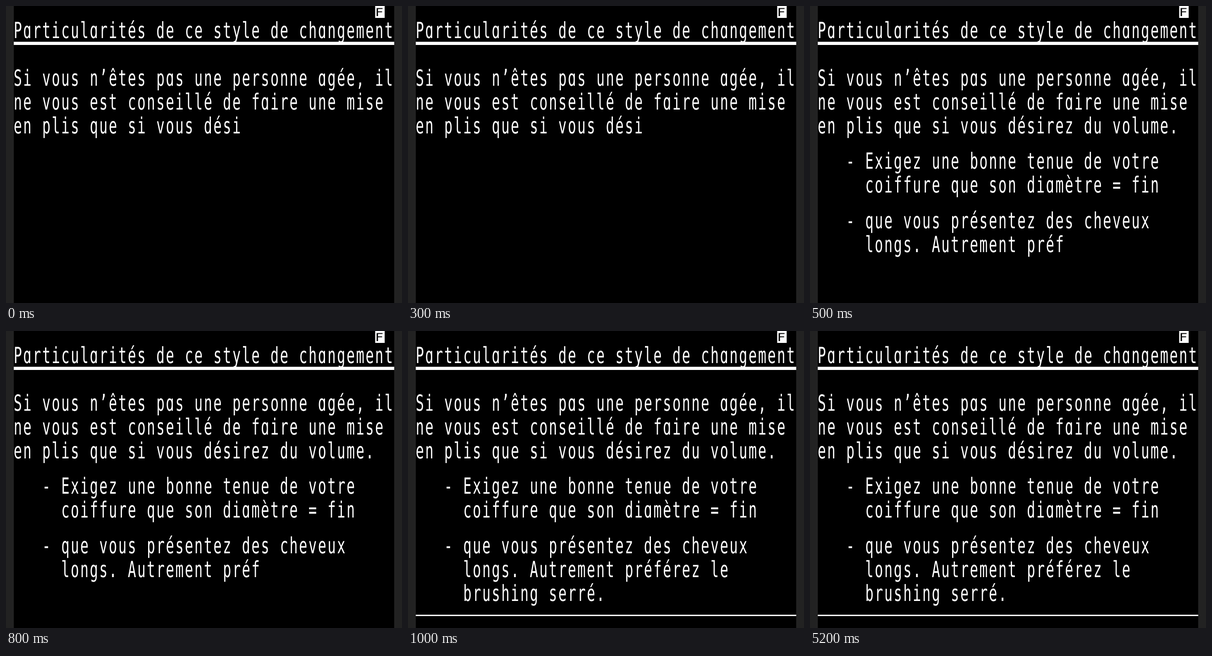
Recreate the animation shown at these times as an HTML page. Size 864 px wide and 648 px high, loop 8000 ms.

```html
<!DOCTYPE html>
<html lang="fr">
<head>
<meta charset="utf-8">
<title>Page télétexte</title>
<style>
  html, body { margin: 0; width: 100%; height: 100%; overflow: hidden; background: #000; }
  svg { display: block; width: 100vw; height: 100vh; }
  text {
    font: 30px "DejaVu Sans Mono", "Noto Sans Mono", monospace;
    letter-spacing: 2.69px;
    white-space: pre;
    text-rendering: geometricPrecision;
    fill: #fff;
  }
</style>
</head>
<body>
<svg id="stage" viewBox="0 0 864 648">
  <rect width="864" height="648" fill="#222"/>
  <rect x="17" width="830" height="648" fill="#000"/>
  <rect x="805.5" width="20.7" height="26" fill="#fff"/>
  <text transform="translate(805.3 21.5) scale(1 .8)" style="fill:#000">F</text>
  <rect x="17" y="78" width="830" height="7" fill="#fff"/>
  <g id="page"></g>
  <rect id="footer" x="17" y="619" width="830" height="3" fill="#fff"/>
</svg>
<script>
const LOOP = 8000;
const STEP = 500;
const ROW = 25.92;

// Each bar marks where the transmission pauses.
const content = `Particularités de ce style de changement
Si vous n’êtes pas une personne agée, il
ne vous est conseillé de faire une mise
en plis que si vous dési|rez du volume.
   - Exigez une bonne tenue de votre
     coiffure que son diamètre = fin
   - que vous présentez des cheveux
     longs. Autrement préf|érez le
     brushing serré.`;

const chunks = content.split("|");
const rowEnds = [3, 7, 9, 11, 14, 16, 19, 21, 23];
const page = document.getElementById("page");
const footer = document.getElementById("footer");

// Double-height text, one element per line.
const lines = rowEnds.map(end => {
  const line = document.createElementNS("http://www.w3.org/2000/svg", "text");
  line.setAttribute("transform", `translate(16.8 ${end * ROW - 7.6}) scale(1 1.62)`);
  return page.appendChild(line);
});

let current = -1;

function draw(time) {
  const stage = Math.min(chunks.length - 1, Math.floor((time % LOOP) / STEP));
  if (stage === current) return;
  current = stage;
  const shown = chunks.slice(0, stage + 1).join("").split("\n");
  lines.forEach((line, i) => {
    const text = shown[i] || "";
    line.setAttribute("aria-label", text.trim());
    line.textContent = text.replace(/a/g, "ɑ"); // single-storey letterform
  });
  footer.style.display = stage === chunks.length - 1 ? "" : "none";
}

const start = performance.now();
function tick() {
  draw(performance.now() - start);
  requestAnimationFrame(tick);
}
tick();
</script>
</body>
</html>
```
